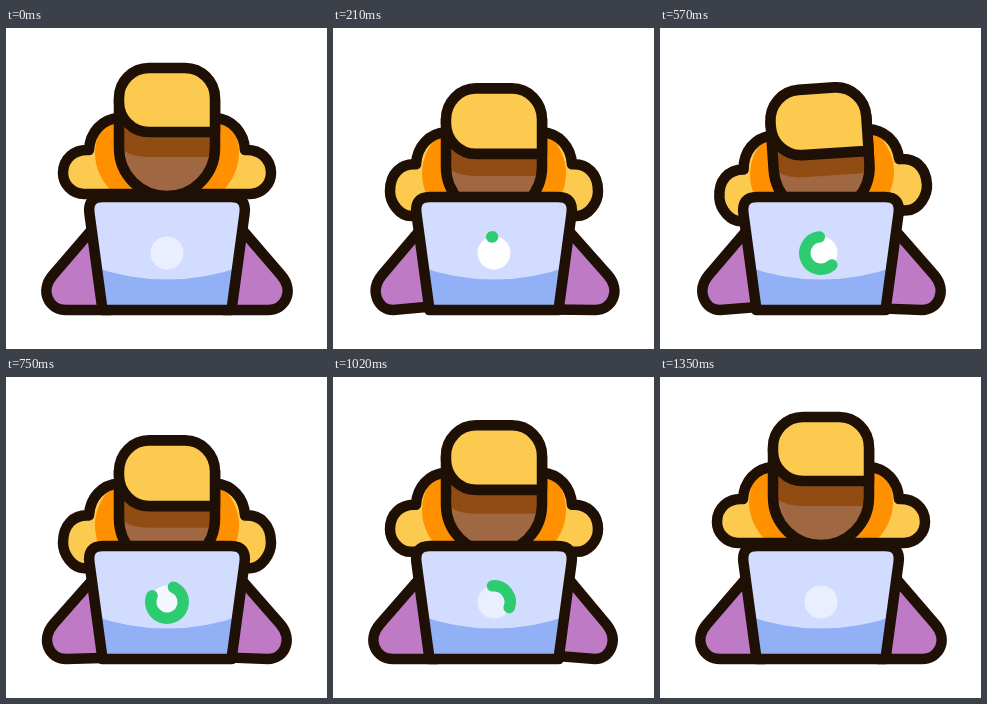
Recreate the animation shown at these times as an HTML page. Size 321 px wide and 321 px high, loop 1.5 s.

```html
<!DOCTYPE html>
<html lang="en">
<head>
<meta charset="utf-8">
<title>Typing on a laptop</title>
<style>
  html, body { margin: 0; width: 100%; height: 100%; overflow: hidden; background: #fff; }
  svg { display: block; width: 100%; height: 100%; }
  .line { stroke: #1f1005; stroke-width: 10.5; stroke-linejoin: round; stroke-linecap: round; }
</style>
</head>
<body>
<svg viewBox="0 0 321 321">
  <defs>
    <path id="hair"/>
    <path id="face" d="M113 72V120a48 48 0 0 0 96 0V72Z"/>
    <path id="lid" d="M96.500 282L83.500 186Q81 169 97 169H225Q241 169 238.500 186L225.500 282Z"/>
    <clipPath id="inHair"><use href="#hair"/></clipPath>
    <clipPath id="inFace"><use href="#face"/></clipPath>
    <clipPath id="inLid"><use href="#lid"/></clipPath>
  </defs>

  <g id="head">
    <use href="#hair" fill="#fdca50"/>
    <g clip-path="url(#inHair)"><ellipse id="glow" cx="161" cy="125" rx="72" ry="60" fill="#ff9100"/></g>
    <use href="#hair" class="line" fill="none"/>
    <g id="skin">
      <use href="#face" fill="#a06743"/>
      <path d="M113 90H209V129H143Q122 129 113 118Z" fill="#914c13" clip-path="url(#inFace)"/>
      <use href="#face" class="line" fill="none"/>
    </g>
    <path id="hat" class="line" fill="#fdca50" d="M209 104H143A30 30 0 0 1 113 74V70A30 30 0 0 1 143 40H179A30 30 0 0 1 209 70Z"/>
  </g>

  <path id="left" class="line" fill="#bf7ac6"/>
  <path id="right" class="line" fill="#bf7ac6" transform="translate(322) scale(-1 1)"/>

  <use href="#lid" fill="#d2dcff"/>
  <path d="M80 236Q161 267 242 236V290H80Z" fill="#91b0f5" clip-path="url(#inLid)"/>
  <use href="#lid" class="line" fill="none"/>
  <circle id="light" cx="161" cy="225" r="16.500" fill="#fff"/>
  <path id="loader" fill="none" stroke="#2ecc71" stroke-width="11.500" stroke-linecap="round"/>
</svg>
<script>
  const LOOP = 1500, STEP = 30;
  const set = (id, name, value) => document.getElementById(id).setAttribute(name, value);
  const smooth = (t, from, to) => {
    const x = Math.min(1, Math.max(0, (t - from) / (to - from)));
    return x * x * (3 - 2 * x);
  };

  // One key press every 125 ms
  const tap = (t, peak, end) =>
    t >= end ? 0 : smooth(t, 60, 150) * (0.5 + 0.5 * Math.cos((t - peak) / 125 * 2 * Math.PI));

  // The crown sinks less than the lobes below it
  function hairPath(drop) {
    const top = 0.7 * drop, low = 1.07 * drop, mid = (top + low) / 2;
    return `M113 ${90 + top}C96 ${91 + top} 84 ${104 + top} 83 ${122 + top}
      C68 ${121 + top} 57 ${131 + top} 57 ${145 + mid}
      C57 ${156.5 + mid} 66.5 ${166 + low} 78 ${166 + low}H244
      C255.5 ${166 + low} 265 ${156.5 + mid} 265 ${145 + mid}
      C265 ${131 + top} 254 ${121 + top} 239 ${122 + top}
      C238 ${104 + top} 226 ${91 + top} 209 ${90 + top}Z`;
  }

  const armPath = (press, drop) =>
    `M90 ${197 + 0.08 * drop}L${47 + 2 * press} 247
     C${33 + 3 * press} 263 ${43 + 2 * press} 282 60 282L104 ${282 - 4 * press}`;

  const ringPoint = deg => {
    const a = deg * Math.PI / 180;
    return `${161 - 16.2 * Math.sin(a)} ${225 - 16.2 * Math.cos(a)}`;
  };

  // Arc running counter-clockwise from the top
  function ringArc(from, to) {
    const mid = (from + to) / 2, arc = 'A16.2 16.2 0 0 0 ';
    return `M${ringPoint(from)}${arc}${ringPoint(mid)}${arc}${ringPoint(to)}`;
  }

  function draw(t) {
    const drop = 20.5 * smooth(t, 60, 210) + 3 * smooth(t, 690, 750) - 23.5 * smooth(t, 825, 1150);
    const tilt = t > 210 && t < 690 ? -3.8 * Math.sin((t - 450) / 480 * 2 * Math.PI) : 0;
    set('head', 'transform', `rotate(${tilt} 161 ${110 + drop})`);
    set('hair', 'd', hairPath(drop));
    set('glow', 'transform', `translate(0 ${drop})`);
    set('skin', 'transform', `translate(0 ${0.93 * drop})`);
    set('hat', 'transform', `translate(0 ${0.955 * drop}) scale(1 ${1 + drop / 900})`);

    set('left', 'd', armPath(tap(t, 210, 1022), drop));
    set('right', 'd', armPath(tap(t, 1035, 1222), drop));

    set('light', 'opacity', 0.55 + 0.45 * (smooth(t, 60, 210) - smooth(t, 600, 900)));

    const tail = 5 + 360 * smooth(t, 550, 1305), tip = 5.1 + 360 * smooth(t, 173, 871);
    set('loader', 'd', t > 173 && t < 1305 ? ringArc(tail, tip) : '');
  }

  const start = performance.now();
  function frame() {
    const t = (performance.now() - start) % LOOP;
    draw(Math.floor(t / STEP) * STEP);
    requestAnimationFrame(frame);
  }
  frame();
</script>
</body>
</html>
```
